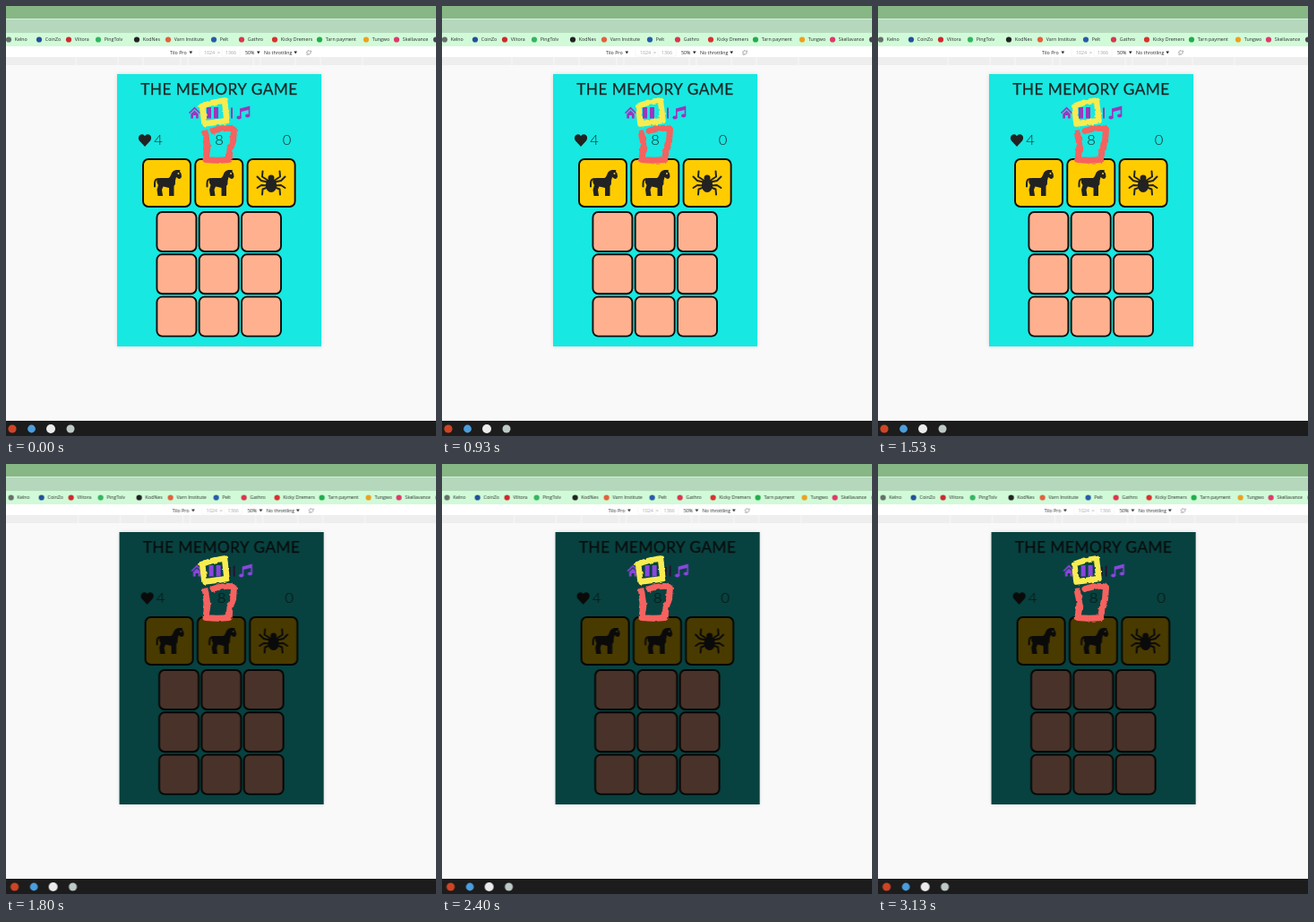
Animation, 480 px wide and 480 px high, one loop 3190 ms. Source, as an HTML page:

```html
<!DOCTYPE html>
<html lang="en">
<head>
<meta charset="utf-8">
<title>Memory game</title>
<style>
  html, body { margin: 0; width: 100%; height: 100%; overflow: hidden; background: #f9f9f9; }
  svg { display: block; width: 100vw; height: 100vh; }
  .ui { font: 5.3px "Open Sans", "Noto Sans", sans-serif; fill: #262b28; }
  .game { font: 300 16.5px Lato, sans-serif; fill: #1c2526; text-anchor: middle; }
  .title { font-weight: 400; font-size: 17.3px; letter-spacing: .45px; stroke: #1c2526; stroke-width: .25; stroke-linejoin: round; }
  .ink { fill: #222; }
  .line { fill: none; stroke: #222; stroke-width: 2; stroke-linecap: round; stroke-linejoin: round; }
  .board { fill: #17e8e1; filter: drop-shadow(0 0 2px rgba(0, 0, 0, .13)); }

  .page { animation: shift 3190ms step-end infinite; }
  .shade { opacity: 0; animation: shade 3190ms step-end infinite; }
  .controls { fill: #9c35bd; animation: glow 3190ms step-end infinite; }
  @keyframes shift { 0% { transform: none; } 50.16% { transform: translateX(2.6px); } }
  @keyframes shade { 0% { opacity: 0; } 50.16% { opacity: .715; } }
  @keyframes glow { 0% { fill: #9c35bd; } 50.16% { fill: #8b46df; } }

  /* three hand-drawn poses, sixteen rounds per loop */
  .pose { opacity: 0; animation: pose 199.375ms step-end infinite; }
  .pose path { fill: none; stroke-linecap: round; stroke-linejoin: round; }
  @keyframes pose { 0% { opacity: 1; } 33.333% { opacity: 0; } 100% { opacity: 0; } }
</style>
</head>
<body>
<svg viewBox="0 0 480 480">
  <defs>
    <g id="horse">
      <path class="ink" d="M19 21H28C31 20.5 31 16 33 14C35 11.5 39 12 41.5 12.3L41 13.8Q43.5 16 43 19.500Q42.500 22.500 39.500 21.800L37 20L36 24Q36.500 28 34.500 30V41H29V32L22.500 30.500L21 34L22 41H16.500L15.500 34L17 29Q14.500 26 15.500 23Q16.500 21 19 21Z"/>
      <path class="line" d="M17 22Q13 22 13 27V30.500"/>
      <circle cx="39.500" cy="16" r="1" fill="#fc0"/>
    </g>
    <path id="legs" class="line" d="M-4-3L-10-7L-9.500-13M-4-1L-11-2.500L-15.500-7M-4 3L-11 2.500L-15.500 5.500M-4 5L-9.500 7L-10 13"/>
  </defs>

  <rect width="480" height="480" fill="#f9f9f9"/>
  <rect width="480" height="14" fill="#86b785"/>
  <rect y="14" width="480" height="16" fill="#b5d8bc"/>
  <rect y="14" width="480" height="1" fill="#d3f0d8"/>
  <rect y="30" width="480" height="15" fill="#d1fad8"/>
  <rect y="45" width="480" height="12" fill="#fff"/>
  <rect y="57" width="480" height="9" fill="#eee"/>
  <rect y="463" width="480" height="17" fill="#1c1c1c"/>

  <g class="page">
    <g id="bookmarks" class="ui"></g>
    <path d="M78 57v9M125 57v9M153 57v9M195 57v9M203 57v9M276 57v9M284 57v9M323 57v9M351 57v9M398 57v9" stroke="#fafafa" stroke-width=".8"/>
    <g class="ui">
      <text x="183" y="53.8">Tilo Pro</text>
      <text x="267" y="53.8">50%</text>
      <text x="288" y="53.8">No throttling</text>
      <g fill="#a3a3a3">
        <text x="221" y="53.8">1024</text><text x="236" y="53.8">×</text><text x="245" y="53.8">1366</text>
      </g>
      <path d="M204.500 50.500h3.600l-1.800 3zM280 50.500h3.600l-1.800 3zM321.400 50.500h3.600l-1.800 3z"/>
      <path d="M216 48v8h20v-8M241 48v8h20v-8" fill="none" stroke="#eee" stroke-width=".5"/>
      <path d="M335.500 51.500l2.500-2 2.500 2.500-2.500 2.500zM340 49.500l1 1.500M335.500 53.500l1.200 1.500" fill="none" stroke="#777" stroke-width=".7"/>
    </g>

    <rect class="board" x="124" y="76" width="228" height="304"/>
    <g class="game">
      <text class="title" x="238" y="98.500">THE MEMORY GAME</text>
      <text x="170" y="155">4</text>
      <text x="238" y="155">8</text>
      <text x="313.500" y="155">0</text>
    </g>
    <path class="ink" d="M155 157L149 150.500C146.500 147 149 143 152 143.300Q154 143.500 155 145.300Q156 143.500 158 143.300C161.500 143 163.500 147 161 150.500Z"/>
    <path d="M245.500 115h2.500v10h-2.500zM251 113.500h2v12h-2z" fill="#8d3ba9"/>
    <g id="cards" stroke="#0c0c0c" stroke-width="1.900"></g>
    <use href="#horse" x="153" y="171"/>
    <use href="#horse" x="211.500" y="171"/>
    <g transform="translate(296 197.500)">
      <use href="#legs"/>
      <use href="#legs" transform="scale(-1 1)"/>
      <ellipse class="ink" cy="2.800" rx="6.200" ry="7.700"/>
      <circle class="ink" cy="-5.500" r="3.500"/>
    </g>
    <rect class="shade" x="124" y="76" width="228" height="304"/>

    <g class="controls">
      <path d="M204 119L210.500 112.500L217 119L216 120.200L210.500 115L205 120.200Z"/>
      <path d="M206.300 120.500L210.500 116.500L214.700 120.500V125.500H212V122H209V125.500H206.300Z"/>
      <path d="M224 113h5v12.500h-5zM232 113h5v12.500h-5z"/>
      <path d="M261 114.500L272.300 111.500V122.500H270.700V116L262.600 118V125H261Z"/>
      <ellipse cx="260" cy="124.500" rx="2.600" ry="2"/>
      <ellipse cx="269.700" cy="122.500" rx="2.600" ry="2"/>
    </g>

    <circle cx="7" cy="472" r="4.600" fill="#cf4425"/>
    <circle cx="28.500" cy="472" r="4.400" fill="#4b9ddd"/>
    <circle cx="50" cy="472" r="5" fill="#ececec"/>
    <circle cx="72" cy="472" r="4.500" fill="#bdc9c5"/>
  </g>
  <g id="marks"></g>
</svg>
<script>
  const fill = (id, html) => { document.getElementById(id).innerHTML = html; };

  const bookmarks = [
    [3, "Kelno", "#66706a"], [37, "CoinZo", "#22509c"], [70, "Viltora", "#cf2830"],
    [103, "PingTolv", "#35b563"], [146, "KodNes", "#222"], [181, "Varn Institute", "#e3603d"],
    [232, "Pelt", "#285bab"], [263, "Gathro", "#dc3550"], [300, "Kicky Dremers", "#da3030"],
    [350, "Tarn payment", "#22ad4d"], [402, "Tungwo", "#eda022"], [436, "Skellavance", "#df396b"],
    [480, "", "#4a4450"]
  ];
  fill("bookmarks", bookmarks.map(([x, name, color]) =>
    `<circle cx="${x}" cy="37.500" r="3.100" fill="${color}"/><text x="${x + 6.8}" y="39.300">${name}</text>`
  ).join(""));

  const card = (x, y, size, color) =>
    `<rect x="${x}" y="${y}" width="${size}" height="${size}" rx="6" fill="${color}"/>`;
  let cards = "";
  for (let i = 0; i < 3; i++) cards += card(153 + i * 58.3, 171, 53, "#fc0");
  for (let i = 0; i < 9; i++) {
    cards += card(168.4 + i % 3 * 47.3, 230 + Math.floor(i / 3) * 47.3, 44, "#ffb08f");
  }
  fill("cards", cards);

  // each pose roughens the same strokes with its own noise
  const strokes = `
    <path d="M218.500 112Q230 107 244 105.500L246.500 128Q233 130 221.500 131.500L219.500 115" stroke="#f8ec50" stroke-width="6.500"/>
    <path d="M231 139.500Q246 134.500 254.500 137.500L253.500 151L250 160L249 171.500Q236 173 223 171.500L225 156L222.500 142" stroke="#f6625f" stroke-width="7"/>`;
  fill("marks", [4, 11, 23].map((seed, i) => `
    <filter id="rough${i}" x="200" y="90" width="75" height="95" filterUnits="userSpaceOnUse" color-interpolation-filters="sRGB">
      <feTurbulence type="fractalNoise" baseFrequency=".16" numOctaves="2" seed="${seed}"/>
      <feDisplacementMap in="SourceGraphic" scale="3" xChannelSelector="R" yChannelSelector="G"/>
    </filter>
    <g class="pose" style="animation-delay:${i * 66.458 - 204.375}ms"><g filter="url(#rough${i})">${strokes}</g></g>`
  ).join(""));
</script>
</body>
</html>
```
